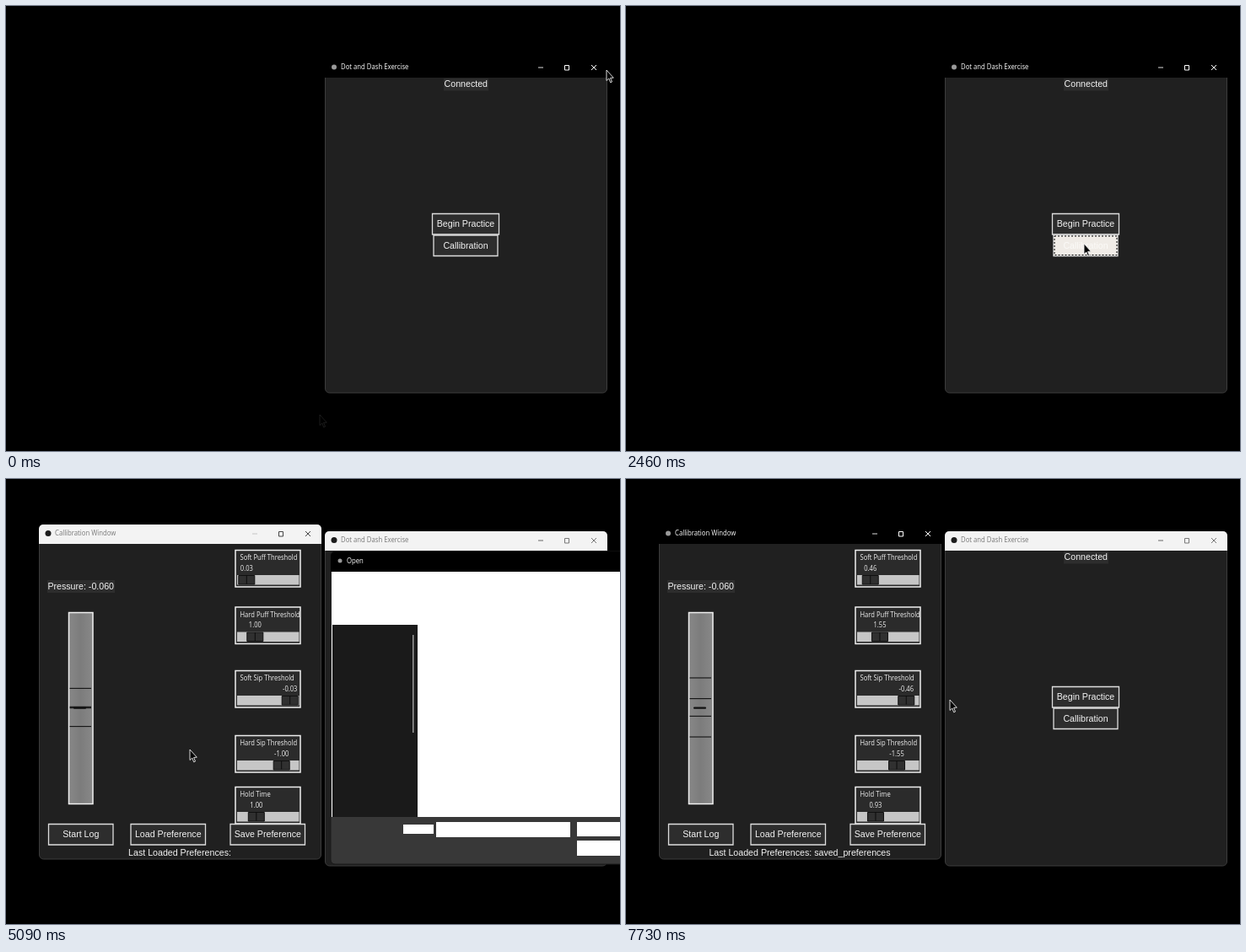
Write an HTML page with a canvas that moves like this. It is 728 px wide and 528 px high and loops after 8 s.

```html
<!DOCTYPE html>
<html lang="en">
<head>
<meta charset="utf-8">
<title>Calibration demo</title>
<style>
html, body { margin: 0; width: 100%; height: 100%; overflow: hidden; background: #000; }
canvas { display: block; width: 728px; height: 528px; }
</style>
</head>
<body>
<canvas id="stage" width="728" height="528"></canvas>
<script>
const g = document.getElementById('stage').getContext('2d');
const LOOP = 8000;
const ASPECT = 0.91;
const SANS = '"Liberation Sans", Arial, sans-serif';
const UI = '"Open Sans", "Noto Sans", sans-serif';
const APP = 'Dot and Dash Exercise';

// Pointer path: time, x, y
const PATH = [
  [0, 712, 76], [600, 712, 76], [930, 654, 466], [1130, 653, 466],
  [1600, 545, 258], [1860, 543, 282], [2480, 543, 282], [2850, 361, 428],
  [2920, 361, 428], [3180, 246, 432], [3310, 218, 420], [4310, 218, 420],
  [4630, 218, 321], [5200, 218, 321], [5560, 407, 411], [5690, 407, 411],
  [5890, 574, 243], [6030, 574, 243], [6250, 575, 235], [6950, 575, 235],
  [7410, 384, 262], [LOOP, 384, 262]
];

const ramp = (t, a, b) => Math.min(1, Math.max(0, (t - a) / (b - a)));
const within = (t, a, b) => t >= a && t < b;

function rect(x, y, w, h, fill, stroke, r = 0, line = 1) {
  g.beginPath();
  g.roundRect(x, y, w, h, r);
  if (fill) { g.fillStyle = fill; g.fill(); }
  if (stroke) { g.strokeStyle = stroke; g.lineWidth = line; g.stroke(); }
}

function lines(points, color, width = 1) {
  g.beginPath();
  for (let i = 0; i < points.length; i += 2) g.lineTo(points[i], points[i + 1]);
  g.strokeStyle = color;
  g.lineWidth = width;
  g.stroke();
}

function dot(x, y, r, color) {
  g.beginPath();
  g.arc(x, y, r, 0, Math.PI * 2);
  g.fillStyle = color;
  g.fill();
}

function text(s, x, y, color = '#fff', size = 8.3, font = UI, align = 'left') {
  g.save();
  g.translate(x, y);
  g.scale(ASPECT, 1);
  g.font = size + 'px ' + font;
  g.textAlign = align;
  g.textBaseline = 'middle';
  g.fillStyle = color;
  g.fillText(s, 0, 0);
  g.restore();
}

const label = (s, x, y, color = '#f4f4f4') => text(s, x, y, color, 11.7, SANS, 'center');

function faded(alpha, draw, zoom = 1, cx = 0, cy = 0) {
  if (alpha <= 0) return;
  g.save();
  g.globalAlpha *= alpha;
  g.translate(cx, cy);
  g.scale(zoom, zoom);
  g.translate(-cx, -cy);
  draw();
  g.restore();
}

function captionButtons(x, y, color, minColor) {
  lines([x + 253, y + 11, x + 259, y + 11], minColor);
  rect(x + 284.5, y + 8.5, 5, 5.5, null, color);
  lines([x + 316, y + 8, x + 322, y + 14], color);
  lines([x + 322, y + 8, x + 316, y + 14], color);
}

function titleBar(x, y, name, active, icon, minOff) {
  rect(x, y, 335, 23, '#000', null, [5, 5, 0, 0]);
  faded(active, () => {
    dot(x + 11, y + 10.5, 3, icon || '#999');
    text(name, x + 19, y + 11, '#fff', 8.5);
    captionButtons(x, y, '#fff', '#ddd');
  });
  faded(1 - active, () => {
    rect(x, y, 335, 23, '#f3f3f3', null, [5, 5, 0, 0]);
    dot(x + 11, y + 10.5, 3.5, icon || '#1c1c1c');
    text(name, x + 19, y + 11, '#787878', 8.5);
    captionButtons(x, y, minOff ? '#444' : '#777', minOff ? '#c4c4c4' : '#666');
  });
}

const body = (x, y) => rect(x + 0.5, y + 22.5, 334, 374.5, '#202020', '#3c3c3c', [0, 0, 5, 5]);

function button(s, x, y, w, hover, ring) {
  rect(x + 0.5, y + 0.5, w, 24.5, hover ? '#f0ece7' : '#2d2d2d', '#dedede', 0, 1.3);
  label(s, x + w / 2 + 0.5, y + 13, hover ? '#fbfaf8' : '#f4f4f4');
  if (!ring) return;
  g.setLineDash([2, 2]);
  rect(x + 1.5, y + 1.5, w - 2, 22.5, null, '#000');
  g.setLineDash([]);
}

function mainWindow(t) {
  const active = t < 1500 ? 1 - ramp(t, 700, 900)
    : t < 4000 ? ramp(t, 2320, 2400) - ramp(t, 2550, 2650)
    : ramp(t, 7200, 7300) - ramp(t, 7470, 7560);
  body(378, 62);
  titleBar(378, 62, APP, active, within(t, 2600, 3800) ? '#41627f' : '');
  if (within(t, 200, 650)) {
    rect(682, 62, 31, 22, '#c42b1c', null, [0, 5, 0, 0]);
    lines([694, 70, 700, 76], '#fff');
    lines([700, 70, 694, 76], '#fff');
  }
  rect(519, 86, 53, 14.5, '#2d2d2d');
  label('Connected', 545.3, 93);
  button('Begin Practice', 505, 246, 79, within(t, 1500, 1680));
  button('Callibration', 506.5, 271.5, 76, within(t, 1680, 2560), within(t, 2060, 2560));
}

function slider(name, y, value, origin, unit) {
  const x = origin + unit * value;
  rect(272, y, 77, 43.5, '#2b2b2b', '#efefef', 0, 1.5);
  g.save();
  g.beginPath();
  g.rect(272, y, 77, 43);
  g.clip();
  text(name, 277.5, y + 9.5, '#f2f2f2', 8.35);
  g.restore();
  text(value.toFixed(2), x + 10, y + 22, '#f2f2f2', 8.3, UI, 'center');
  rect(274, y + 29.5, 73.5, 11.5, '#c6c6c6');
  rect(x + 0.5, y + 30, 19, 10.5, '#303030', '#111');
  lines([x + 10, y + 30, x + 10, y + 40], '#0c0c0c');
}

function gauge(levels) {
  const shade = g.createLinearGradient(74, 0, 103, 0);
  shade.addColorStop(0, '#888');
  shade.addColorStop(0.5, '#7c7c7c');
  shade.addColorStop(1, '#888');
  rect(74.5, 158.5, 28.5, 227, shade, '#f0f0f0', 0, 1.5);
  const row = v => 271 - 22.6 * v;
  levels.forEach(v => lines([75.5, row(v), 101, row(v)], '#111', 1.1));
  rect(80, 270.5, 15, 2.2, '#111', null, 1);
}

function calibration(t) {
  const loaded = t >= 7500;
  const [soft, hard, hold] = loaded ? [0.46, 1.55, 0.93] : [0.03, 1, 1];
  const active = t < 6000 ? 1 - ramp(t, 3700, 3850) : ramp(t, 7560, 7680);
  body(39, 54);
  titleBar(39, 54, 'Callibration Window', active, t < 3800 ? '#5a83a6' : '', true);
  rect(49, 120, 80, 15, '#2d2d2d');
  label('Pressure: -0.060', 88.7, 128);
  gauge([soft, hard, -soft, -hard]);
  slider('Soft Puff Threshold', 84.5, soft, 275, 10.3);
  slider('Hard Puff Threshold', 152, hard, 275, 10.3);
  slider('Soft Sip Threshold', 227.5, -soft, 327, 10.3);
  slider('Hard Sip Threshold', 304.5, -hard, 327, 10.3);
  slider('Hold Time', 365.5, hold, 274.8, 12);
  button('Start Log', 50, 409, 76.5);
  button('Load Preference', 147.5, 409, 88.5, within(t, 3240, 4380));
  button('Save Preference', 265.5, 409, 88.5, within(t, 2800, 3230));
  label('Last Loaded Preferences:' + (loaded ? ' saved_preferences' : ''), 206, 443.5);
}

function blankDialog() {
  rect(385, 86, 360, 371, '#383838', '#1a1a1a', 5);
  rect(385, 86, 360, 24, '#000', null, [5, 0, 0, 0]);
  dot(396, 97, 2.5, '#999');
  text('Open', 404, 98, '#fff', 8.5);
  rect(386, 110, 350, 291, '#fff');
  rect(387, 173, 101, 228, '#1a1a1a');
  rect(482, 185, 1.5, 116, '#9a9a9a');
  rect(471, 410, 36, 11, '#fff');
  rect(510, 407, 159, 18, '#fff');
  rect(677, 407, 60, 17, '#fff');
  rect(677, 429, 60, 18, '#fff');
}

function folder(x, y) {
  rect(x - 5, y - 4.5, 5, 3, '#d99c2b', null, 1);
  rect(x - 5, y - 3, 10.5, 8, '#f5cc60', null, 1);
}

function chevron(x, y, color = '#ddd', dx = 2.5, dy = 1.5) {
  lines([x - dx, y - dy, x, y + dy, x + dx, y - dy], color);
}

function arrow(x, y, angle, color) {
  g.save();
  g.translate(x, y);
  g.rotate(angle);
  lines([-4, 0, 4, 0], color, 1.1);
  lines([1, -3, 4, 0, 1, 3], color, 1.1);
  g.restore();
}

function pin(x, y) {
  g.save();
  g.translate(x, y);
  g.rotate(Math.PI / 4);
  rect(-2, -4, 4, 5, '#aaa');
  lines([-3, 1, 3, 1], '#aaa');
  lines([0, 1, 0, 5], '#aaa');
  g.restore();
}

function fileRow(name, date, y, shade) {
  if (shade) rect(500, y - 9.5, 240, 19, shade);
  rect(504, y - 5, 7, 10, '#f2f2f2', null, 1);
  rect(506, y - 2, 3, 4, '#9aa884');
  text(name, 515.5, y, '#fff', 8.15);
  text(date, 676.5, y, shade ? '#ddd' : '#ccc', 8.15);
}

function sidebar() {
  rect(385, 225.5, 91, 22.5, '#323232', null, 2);
  g.beginPath();
  [[405, 189], [411, 183], [417, 189], [415.5, 189], [415.5, 195], [406.5, 195], [406.5, 189]]
    .forEach(p => g.lineTo(...p));
  g.fillStyle = '#e8e2dc';
  g.fill();
  rect(409.5, 190, 3, 5, '#d07a36');
  rect(406, 207.5, 10.5, 10.5, '#3f9be0', null, 2);
  lines([407, 217, 411, 212, 416, 217], '#e9f5ff', 1.5);
  dot(411, 237, 5, '#2b8fd6');
  rect(406, 280, 10.5, 9, '#2f95dc', null, 1);
  rect(408, 282, 2, 2, '#e2f3ff');
  rect(408, 285.5, 2, 2, '#e2f3ff');
  arrow(411, 307.5, Math.PI / 2, '#45b3bd');
  lines([406.5, 313.5, 415.5, 313.5], '#45b3bd', 1.2);
  rect(407, 327.5, 8, 10.5, '#8a8268');
  rect(408.5, 329, 5, 3, '#d8c98a');
  [['Home', 189], ['Gallery', 213], ['Desktop', 285], ['Downloads', 309], ['School', 333],
    ['GUI', 357], ['project2', 381], ['Set', 405]].forEach(([s, y]) => text(s, 420, y, '#fff', 8.4));
  g.save();
  g.beginPath();
  g.rect(385, 225, 91, 24);
  g.clip();
  text('Quorvane - Perso', 420, 237, '#fff', 8.4);
  g.restore();
  lines([393, 234.5, 396, 237, 393, 239.5], '#aaa');
  lines([389, 261.5, 471, 261.5], '#3a3a3a');
  [285, 309, 333].forEach(y => pin(471, y));
  [357, 381, 405].forEach(y => folder(411, y));
  rect(481.5, 185, 1.7, 117, '#a8a8a8');
}

function openDialog(t) {
  const picked = t >= 6250;
  rect(383, 84, 360, 377, '#191919', '#111', 5);
  rect(383, 84, 360, 24, '#000', null, [5, 0, 0, 0]);
  text('Open', 389, 96.5, '#fff', 8.5);
  arrow(397, 128, Math.PI, '#ccc');
  arrow(420.5, 128, 0, '#ccc');
  chevron(441, 128);
  arrow(460.5, 128, -Math.PI / 2, '#fff');
  rect(475.5, 115.5, 190, 25, '#262626', '#4c4c4c');
  folder(486, 127.5);
  text('Desktop', 506, 128);
  text('GUI', 550, 128);
  [497, 542].forEach(x => lines([x - 1, 125.5, x + 1.5, 128, x - 1, 130.5], '#fff'));
  chevron(628, 128);
  g.beginPath();
  g.arc(652.5, 128.5, 3.5, 0.2, 5.4);
  g.strokeStyle = '#ddd';
  g.stroke();
  lines([653, 125, 656, 126, 656, 123], '#ddd');
  rect(674.5, 115.5, 70, 25, '#262626', '#4c4c4c');
  text('Search GUI', 680, 128, '#888');
  text('Organize', 395, 160.5);
  g.beginPath();
  g.moveTo(431, 159); g.lineTo(436, 159); g.lineTo(433.5, 162);
  g.fillStyle = '#ddd';
  g.fill();
  text('New folder', 456.5, 160.5);
  sidebar();
  lines([489.5, 172, 489.5, 404], '#333');
  text('Name', 510.5, 182, '#ddd');
  text('Date modified', 676.5, 182, '#ddd');
  lines([672.5, 172, 672.5, 192], '#444');
  lines([586.5, 175, 589, 172.5, 591.5, 175], '#999');
  fileRow('log_test.json', '4/3/24 18:50', 206);
  fileRow('saved_preferences.json', '5/7/24 12:52', 229,
    picked ? '#777' : t >= 6050 ? '#4d4d4d' : '');
  rect(502, 397, 240, 1.7, '#a8a8a8');
  rect(383, 404, 360, 57, '#383838', null, [0, 0, 0, 5]);
  text('File name:', 506.5, 420, '#fff', 8.3, UI, 'right');
  rect(510.5, 411.5, 161, 17, '#383838', '#868686');
  if (picked) text('saved_preferences.json', 512.5, 420.5, '#fff', 8.15);
  chevron(666, 420);
  rect(680.5, 411.5, 70, 16.5, '#333', '#868686');
  text('JSON files (*.json)', 683, 420);
  rect(681.5, 434, 70, 16.5, '#333', '#a5a5a5', 2);
  text('Open', 699, 442);
}

function pointer(x, y) {
  const shape = [0, 0, 0, 12.5, 2.8, 10, 4.7, 14.8, 6.5, 14, 4.6, 9.4, 8.3, 9.2];
  g.beginPath();
  for (let i = 0; i < shape.length; i += 2) g.lineTo(x + shape[i], y + shape[i + 1]);
  g.closePath();
  g.fillStyle = '#000';
  g.fill();
  g.strokeStyle = '#f0f0f0';
  g.lineWidth = 0.9;
  g.stroke();
}

function pointerAt(t) {
  const i = PATH.findIndex(p => p[0] > t);
  const [t0, x0, y0] = PATH[i - 1], [t1, x1, y1] = PATH[i];
  const k = (t - t0) / (t1 - t0);
  return [x0 + (x1 - x0) * k, y0 + (y1 - y0) * k];
}

function draw(t) {
  g.fillStyle = '#000';
  g.fillRect(0, 0, 728, 528);
  if (t < 800) faded(0.12, () => pointer(372, 485));
  mainWindow(t);
  const shown = ramp(t, 2500, 2680);
  faded(shown, () => calibration(t), 0.92 + 0.08 * shown, 206, 252);
  if (within(t, 4830, 5230)) {
    const k = ramp(t, 4830, 5050);
    faded(k, blankDialog, 0.94 + 0.06 * k, 625, 272);
  } else if (within(t, 5230, 7150)) {
    const k = 1 - ramp(t, 7000, 7150);
    faded(k, () => openDialog(t), 0.94 + 0.06 * k, 625, 272);
  }
  if (within(t, 6750, 6900)) dot(576, 236, 8, 'rgba(214, 196, 38, 0.9)');
  if (!within(t, 950, 1130)) pointer(...pointerAt(t));
}

function tick() {
  draw(performance.now() % LOOP);
  requestAnimationFrame(tick);
}
tick();
</script>
</body>
</html>
```
